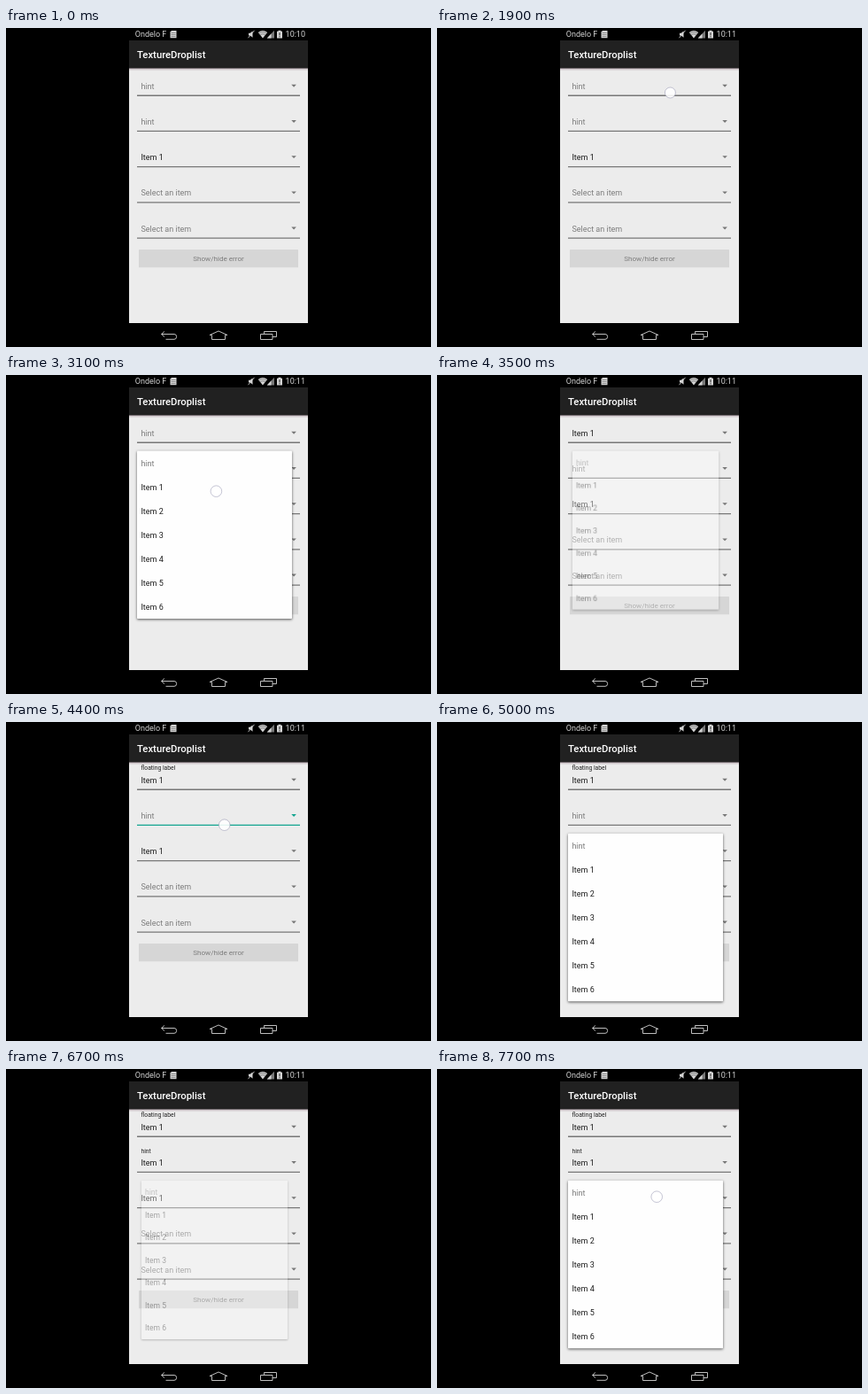
Write an HTML page that moves like this. It is 480x360 px and loops after 8000 ms.

```html
<!DOCTYPE html>
<html lang="en">
<head>
<meta charset="utf-8">
<title>Form spinners</title>
<style>
html, body { margin: 0; width: 100%; height: 100%; overflow: hidden; background: #000; }
svg { display: block; width: 480px; height: 360px; font: 9px Roboto, sans-serif; }
.bar { fill: #d4d4d4; }
.hint { fill: #7c7c7c; }
.item { fill: #1c1c1c; }
.small { font-size: 6.8px; fill: #222; }
.field { color: #777; }
.line { fill: none; stroke: #bdbdbd; stroke-width: 1; stroke-linejoin: round; }
.card { filter: drop-shadow(0 1px 1.4px rgba(0, 0, 0, .65)); }
.touch { fill: rgba(255, 255, 255, .88); stroke: rgba(140, 140, 170, .5); stroke-width: 1; }

/* Every state change lands on a 100 ms step (1.25%). */
.a { animation: 8s step-end -20ms infinite; }
.off { opacity: 0; }

.clock0 { animation-name: clock0; }
.clock1 { animation-name: clock1; }
@keyframes clock0 { 1.25% { opacity: 0 } }
@keyframes clock1 { 1.25% { opacity: 1 } }

.hint1 { animation-name: hint1; }
.item1 { animation-name: item1; }
@keyframes hint1 { 42.5% { opacity: 0 } }
@keyframes item1 { 42.5% { opacity: 1 } }
.hint2 { animation-name: hint2; }
.item2 { animation-name: item2; }
@keyframes hint2 { 67.5% { opacity: 0 } }
@keyframes item2 { 67.5% { opacity: 1 } }

.focus1 { animation-name: focus1; }
@keyframes focus1 { 25% { color: #12a48f } 26.25% { color: #777 } }
.focus2 { animation-name: focus2; }
@keyframes focus2 {
  55%, 77.5% { color: #12a48f }
  56.25%, 78.75% { color: #777 }
}

.label1 { animation-name: label1; }
@keyframes label1 {
  45% { opacity: .05; transform: translateY(4px) }
  46.25% { opacity: .4; transform: translateY(2.5px) }
  47.5% { opacity: .8; transform: translateY(1px) }
  48.75%, 100% { opacity: 1; transform: none }
}
.label2 { animation-name: label2; }
@keyframes label2 {
  70% { opacity: .05; transform: translateY(4px) }
  71.25% { opacity: .4; transform: translateY(2.5px) }
  72.5% { opacity: .8; transform: translateY(1px) }
  73.75% { opacity: 1; transform: none; fill: #222 }
  77.5% { opacity: 1; transform: none; fill: #12a48f }
  78.75%, 100% { opacity: 1; transform: none; fill: #222 }
}

.pop1 { animation-name: pop1; transform-origin: 235.5px 85.5px; }
@keyframes pop1 {
  30% { opacity: .35; transform: scale(.945) }
  31.25% { opacity: .8; transform: scale(.985) }
  32.5% { opacity: 1; transform: none }
  42.5% { opacity: .85; transform: scale(.985) }
  43.75% { opacity: .4; transform: scale(.945) }
  45% { opacity: .04; transform: scale(.907) }
  46.25%, 100% { opacity: 0; transform: none }
}
.pop2 { animation-name: pop2; transform-origin: 235.5px 125.8px; }
@keyframes pop2 {
  60%, 83.75% { opacity: .35; transform: scale(.945) }
  61.25%, 85% { opacity: .8; transform: scale(.985) }
  62.5%, 86.25%, 100% { opacity: 1; transform: none }
  67.5% { opacity: .85; transform: scale(.985) }
  68.75% { opacity: .4; transform: scale(.945) }
  70% { opacity: .04; transform: scale(.907) }
  71.25% { opacity: 0; transform: none }
}

.tap1 { animation-name: tap1; }
@keyframes tap1 { 3.75% { opacity: 1 } 28.75% { opacity: 0 } }
.tap2 { animation-name: tap2; }
@keyframes tap2 { 37.5% { opacity: .6 } 38.75% { opacity: 1 } 42.5% { opacity: 0 } }
.tap3 { animation-name: tap3; }
@keyframes tap3 { 55% { opacity: 1 } 58.75% { opacity: 0 } }
.tap4 { animation-name: tap4; }
@keyframes tap4 { 66.25% { opacity: 1 } 67.5% { opacity: 0 } }
.tap5 { animation-name: tap5; }
@keyframes tap5 { 77.5% { opacity: 1 } 81.25% { opacity: 0 } }
.tap6 { animation-name: tap6; }
@keyframes tap6 { 95% { opacity: .6 } 96.25% { opacity: 1 } }
</style>
</head>
<body>
<svg viewBox="0 0 480 360">
  <defs>
    <linearGradient id="shade" x2="0" y2="1">
      <stop offset="0" stop-color="#c3b5bc"/>
      <stop offset="1" stop-color="#ececec"/>
    </linearGradient>
    <g id="field">
      <path d="M148 75.6h184v1.3h-184z" fill="currentColor"/>
      <path d="M322.3 63.8h5.6l-2.8 2.9z" fill="currentColor"/>
    </g>
    <g id="popup">
      <rect class="card" x="148" y="85.5" width="175" height="189.5" rx=".8" fill="#fefefe"/>
      <text class="hint" x="152.4" y="102.8">hint</text>
      <g class="item">
        <text x="152.4" y="129.8">Item 1</text>
        <text x="152.4" y="156.8">Item 2</text>
        <text x="152.4" y="183.8">Item 3</text>
        <text x="152.4" y="210.8">Item 4</text>
        <text x="152.4" y="237.8">Item 5</text>
        <text x="152.4" y="264.8">Item 6</text>
      </g>
    </g>
  </defs>

  <rect width="480" height="360"/>
  <rect x="139" y="14" width="202" height="32" fill="#212121"/>
  <rect x="139" y="46" width="202" height="287" fill="#ececec"/>
  <rect x="139" y="45.5" width="202" height="3" fill="url(#shade)"/>
  <text x="148" y="34.2" font-size="11.3" font-weight="500" fill="#fff">TextureDroplist</text>

  <!-- status bar -->
  <g class="bar">
    <text x="145.8" y="10.4">Ondelo F</text>
    <path d="M187 3h5.5v8.300h-7v-6.800z"/>
    <path d="M186.500 5.500h5M186.500 7.500h5M186.500 9.500h5" stroke="#666" stroke-width=".6"/>
    <path d="M274 5.800h1.800l2.700-2.400v7.400l-2.700-2.400h-1.800z"/>
    <path d="M273.500 11.200l7-8.400" stroke="#d4d4d4" stroke-width=".9"/>
    <path d="M284.800 5q5.200-4.200 10.400 0l-5.200 6.500z"/>
    <path d="M286 5.800q4-2.900 8 0M287.300 7.600q2.700-1.900 5.400 0" fill="none" stroke="#333" stroke-width=".5"/>
    <path d="M303 2.800v8.700h-8.200z" fill="#777"/>
    <path d="M299.500 6.500v5h-4.700z"/>
    <path d="M306 3.800h1.500v-1h3v1h1.500v7.700h-6z"/>
    <path d="M309 5.200v3.200M309 9.200v1.200" stroke="#222" stroke-width="1"/>
    <text class="a clock0" x="338" y="10.4" text-anchor="end">10:10</text>
    <text class="a off clock1" x="338" y="10.4" text-anchor="end">10:11</text>
  </g>

  <!-- navigation bar -->
  <g class="line">
    <path d="M179 342.500l-3.500 3 3.500 3M175.500 345.500h14.500q2.600 0 2.600 2.900t-2.600 2.900h-9.500"/>
    <path d="M230 346.500l10-4.500 10 4.500h-2.500v5h-15v-5z"/>
    <path d="M287.500 345.500h13.500v6h-13.500zM291.500 345.500v-3h14v6h-4.500"/>
  </g>

  <!-- form -->
  <g class="field">
    <use href="#field" class="a focus1"/>
    <use href="#field" class="a focus2" y="40.2"/>
    <use href="#field" y="80.4"/>
    <use href="#field" y="120.6"/>
    <use href="#field" y="160.8"/>
  </g>
  <text class="small a off label1" x="152.4" y="54.3">floating label</text>
  <text class="small a off label2" x="152.4" y="94.6">hint</text>
  <text class="hint a hint1" x="152.4" y="68.7">hint</text>
  <text class="item a off item1" x="152.4" y="68.7">Item 1</text>
  <text class="hint a hint2" x="152.4" y="108.9">hint</text>
  <text class="item a off item2" x="152.4" y="108.9">Item 1</text>
  <text class="item" x="152.4" y="149.1">Item 1</text>
  <text class="hint" x="152.4" y="189.3">Select an item</text>
  <text class="hint" x="152.4" y="229.5">Select an item</text>
  <rect x="150" y="250" width="180" height="20.300" rx=".6" fill="#d6d6d6"/>
  <text class="hint" x="240" y="263.2" font-size="8.1" text-anchor="middle">Show/hide error</text>

  <g class="a off pop1"><use href="#popup"/></g>
  <g class="a off pop2"><use href="#popup" y="40.3"/></g>

  <g class="touch">
    <circle class="a off tap1" cx="263.400" cy="73" r="6"/>
    <circle class="a off tap2" cx="237.400" cy="131.200" r="6.300"/>
    <circle class="a off tap3" cx="246.700" cy="116.200" r="6.300"/>
    <circle class="a off tap4" cx="240" cy="167" r="6.300"/>
    <circle class="a off tap5" cx="248" cy="102.500" r="6"/>
    <circle class="a off tap6" cx="248.200" cy="144.200" r="6.300"/>
  </g>
</svg>
</body>
</html>
```
